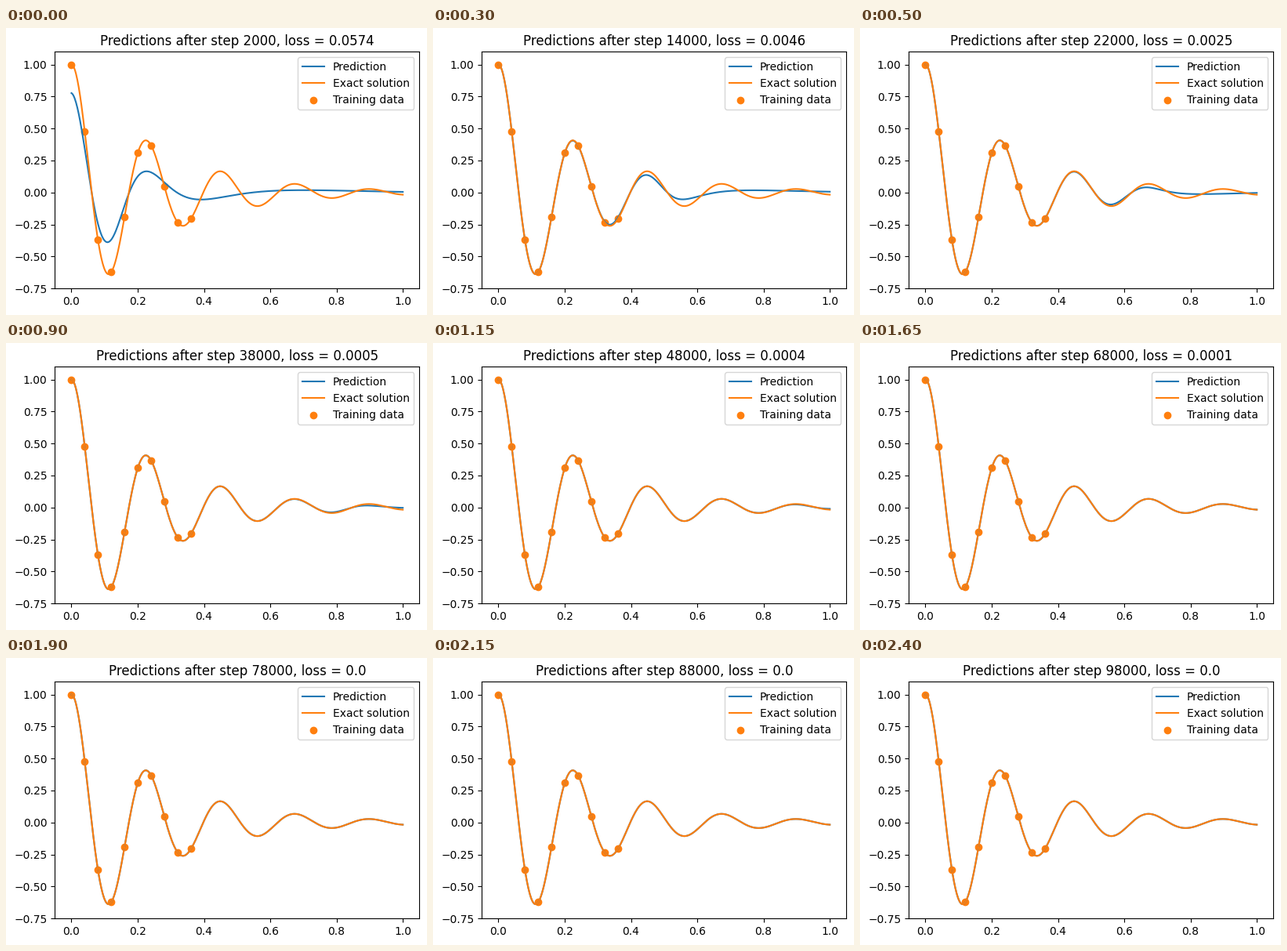
A matplotlib script that plays this animation: 537x366 px, repeating every 2450 ms.

```python
import numpy as np
import matplotlib.pyplot as plt
from matplotlib.animation import FuncAnimation

W, H, DPI = 537, 366, 100
FRAMES, INTERVAL = 49, 50
STEP = 2000
DAMPING, OMEGA = 4, 28

# Training step: loss, interpolated on a log scale
LOSSES = {2000: 0.0574, 14000: 0.0046, 22000: 0.0025,
          38000: 0.0005, 58000: 0.0004, 78000: 0.00004}


def exact(x):
    """Underdamped oscillator starting at rest from 1."""
    phase = np.arctan(-DAMPING / OMEGA)
    return np.exp(-DAMPING * x) * np.cos(OMEGA * x + phase) / np.cos(phase)


def predict(x, step):
    """The fit holds up to a moving front; past it the wave slows and fades."""
    front = np.sqrt((step - 1000) / 48000)
    fresh = np.exp(-(step - STEP) / 3000)
    stretch = 0.22 + 0.18 * fresh
    width = 0.06 + 0.07 * fresh
    floor = 0.25 - 0.15 * fresh

    beyond = np.maximum(x - front, 0)
    slowed = np.minimum(x, front) + stretch * (1 - np.exp(-beyond / stretch))
    gate = 1 / (1 + np.exp((x - front) / width))
    return exact(slowed) * (floor + (1 - floor) * gate)


def loss_at(step):
    logs = np.log(list(LOSSES.values()))
    return float(np.exp(np.interp(step, list(LOSSES), logs)))


x = np.linspace(0, 1, 500)
y = exact(x)

fig = plt.figure(figsize=(W / DPI, H / DPI), dpi=DPI)
ax = fig.add_axes([62.3 / W, 33.76 / H, 465 / W, 302 / H])
line, = ax.plot(x, predict(x, STEP), label="Prediction")
ax.plot(x, y, label="Exact solution")
ax.scatter(x[:200:20], y[:200:20], color="C1", label="Training data")
ax.set_xlim(-0.05, 1.05)
ax.set_ylim(-0.75, 1.1)
ax.legend(loc="upper right")
title = ax.set_title("")


def update(i):
    step = STEP * (i + 1)
    line.set_ydata(predict(x, step))
    title.set_text(f"Predictions after step {step}, loss = {round(loss_at(step), 4)}")
    return line, title


anim = FuncAnimation(fig, update, frames=FRAMES, interval=INTERVAL,
                     repeat=True, repeat_delay=0, blit=False)
plt.show()
```
